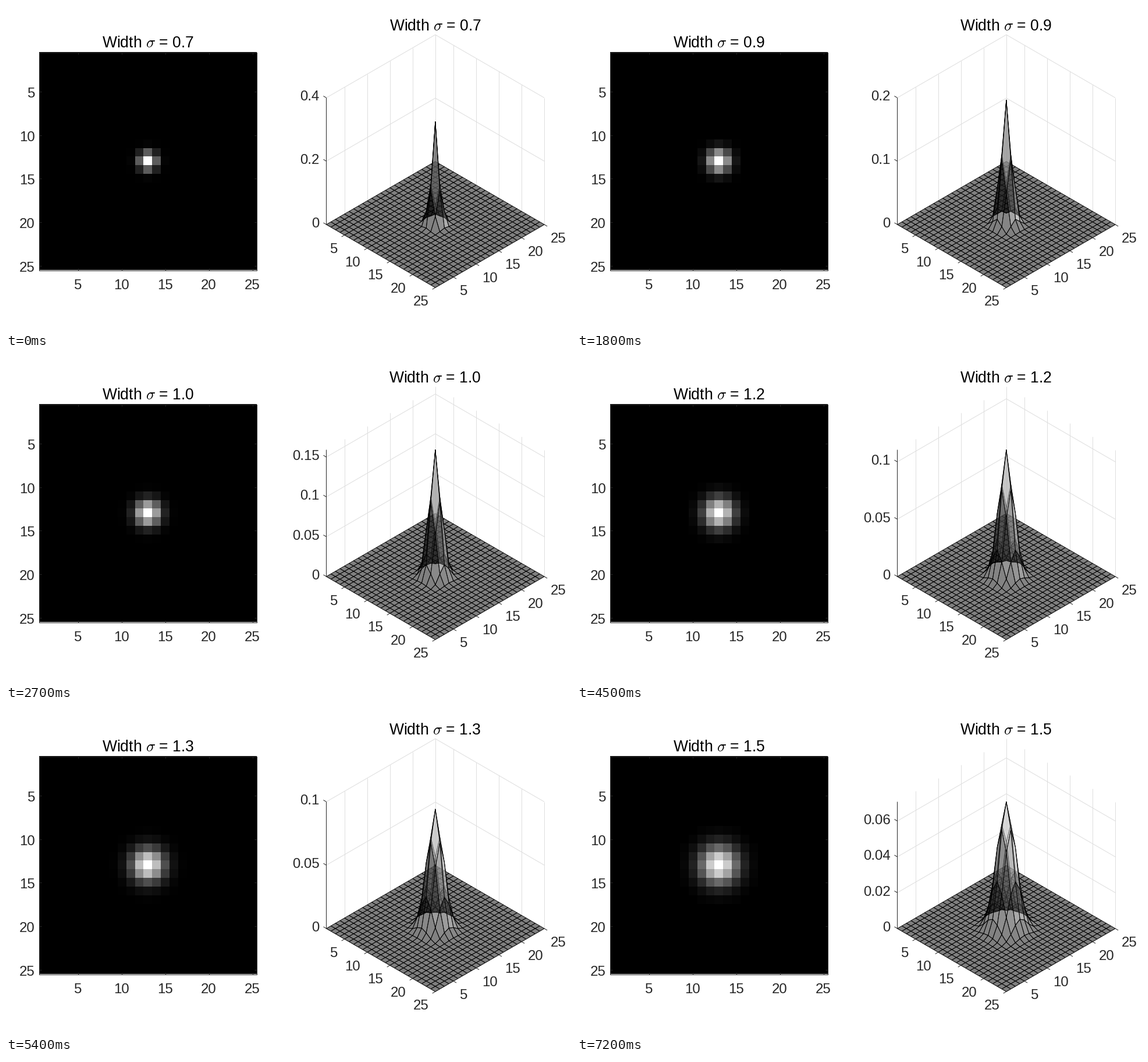
Recreate the animation shown at these times as a matplotlib script. Size 971x556 px, loop 8 s.

```python
import math

import matplotlib as mpl
import matplotlib.pyplot as plt
import numpy as np
from matplotlib.animation import FuncAnimation
from matplotlib.collections import LineCollection, PolyCollection

W, H, DPI = 971, 556, 128
PX = 72 / DPI                       # points per pixel
N = 25
TICKS = range(5, N + 1, 5)
INK = (0.15, 0.15, 0.15)
GRID = (0.87, 0.87, 0.87)
STEP_FRAMES, FRAMES, INTERVAL = 9, 80, 100

# Image panel
LEFT, TOP, SIDE = 57.0, 79.5, 374.0
CELL = SIDE / N

# Isometric surface panel
X0, Y0 = 550.5, 375.0               # left corner of the floor
DX, DY, HEIGHT = 187.3 / (N - 1), 108.2 / (N - 1), 217.5

mpl.rcParams["font.family"] = "Liberation Sans"
mpl.rcParams["mathtext.fontset"] = "cm"

fig = plt.figure(figsize=(W / DPI, H / DPI), dpi=DPI, facecolor="white")
ax = fig.add_axes([0, 0, 1, 1])


def label(x, y, text="", ha="center", size=24, color=INK):
    return ax.text(x, y, text, ha=ha, va="baseline", fontsize=size * PX, color=color)


def lines(segments, color, z, width=1.0):
    group = LineCollection(segments, colors=[color], linewidths=width * PX, zorder=z)
    return ax.add_collection(group, autolim=False)


def project(a, b, h=0.0):
    """Screen place of grid point (a, b) at relative height h."""
    x = X0 + (a + b - 2) * DX
    y = Y0 + (a - b) * DY - h * HEIGHT
    return x, y


def gaussian(sigma):
    r = np.arange(N) - N // 2
    g = np.exp(-(r[:, None] ** 2 + r ** 2) / (2 * sigma ** 2))
    return g / g.sum()


def z_scale(peak):
    """Upper limit and tick step: a round limit unless it wastes too much room."""
    steps = (0.01, 0.02, 0.05, 0.1, 0.2, 0.5)
    step = next(s for s in steps if math.ceil(peak / s) <= 3)
    top = math.ceil(peak / step) * step
    if peak / top < 0.8:
        top = peak
        step = next(s for s in steps if int(peak / s) <= 3)
    return top, step


# Fixed parts of the image panel
image = ax.imshow(np.zeros((N, N)), cmap="gray", vmin=0, vmax=1, aspect="auto",
                  interpolation="nearest", zorder=1,
                  extent=(LEFT, LEFT + SIDE, TOP + SIDE, TOP))
right, bottom = LEFT + SIDE, TOP + SIDE
lines([[(LEFT, TOP), (right, TOP), (right, bottom), (LEFT, bottom), (LEFT, TOP)]], INK, 2)
marks = []
for t in TICKS:
    x, y = LEFT + (t - 0.5) * CELL, TOP + (t - 0.5) * CELL
    marks += [[(x, TOP), (x, TOP + 3.7)], [(x, bottom), (x, bottom - 3.7)],
              [(LEFT, y), (LEFT + 3.7, y)], [(right, y), (right - 3.7, y)]]
    label(x - 0.5, 486.5, str(t))
    label(50, y + 10, str(t), "right")
lines(marks, INK, 2)

# Fixed parts of the surface panel
walls, marks = [], []
for t in TICKS:
    walls += [[project(1, t), project(1, t, 1)], [project(t, N), project(t, N, 1)]]
    x, y = project(t, 1)
    marks.append([(x, y), (x - 5, y + 3)])
    label(x - 11.5, y + 31, str(t), "right")
    x, y = project(N, t)
    marks.append([(x, y), (x + 5, y + 3)])
    label(x + 10.5, y + 31, str(t), "left")
lines(walls, GRID, 1)
lines(marks, INK, 4)
lines([[project(1, 1, 1), project(1, 1), project(N, 1), project(N, N)]], INK, 4)

# Moving parts
z_grid = lines([], GRID, 1)
z_marks = lines([], INK, 4)
z_labels = [label(0, 0, ha="right") for _ in range(4)]
titles = [label(244, 71, size=26.5, color="black"),
          label(737.5, 42, size=26.5, color="black")]
surface = ax.add_collection(
    PolyCollection([], edgecolors="black", linewidths=0.85 * PX, zorder=3), autolim=False)

# Cells from back to front
cells = sorted(((a, b) for a in range(1, N) for b in range(1, N)),
               key=lambda c: c[0] - c[1])


def draw(frame):
    sigma = 0.7 + 0.1 * min(frame // STEP_FRAMES, 8)
    g = gaussian(sigma)
    peak = g.max()
    shade = (g - g.min()) / (peak - g.min())
    top, step = z_scale(peak)
    rel = g / top

    image.set_data(shade)
    for title in titles:
        title.set_text(rf"Width $\sigma$ = {sigma:.1f}")

    polys, colors = [], []
    for a, b in cells:
        corners = ((a, b), (a + 1, b), (a + 1, b + 1), (a, b + 1))
        polys.append([project(i, j, rel[i - 1, j - 1]) for i, j in corners])
        v = shade[a - 1, b - 1]
        colors.append((v, v, v, 0.5))
    surface.set_verts(polys)
    surface.set_facecolor(colors)

    count = int(top / step + 1e-6) + 1
    grid, ticks = [], []
    for k, text in enumerate(z_labels):
        text.set_visible(k < count)
        if k >= count:
            continue
        h = k * step / top
        x, y = project(1, 1, h)
        grid.append([(x, y), project(1, N, h), project(N, N, h)])
        ticks.append([(x, y), (x - 5, y - 3)])
        text.set_text(f"{k * step:g}")
        text.set_position((539, y + 5))
    z_grid.set_segments(grid)
    z_marks.set_segments(ticks)
    return []


ax.set_xlim(0, W)
ax.set_ylim(H, 0)
ax.axis("off")

anim = FuncAnimation(fig, draw, frames=FRAMES, interval=INTERVAL, repeat=True,
                     repeat_delay=0, init_func=lambda: draw(0), blit=False)
plt.show()
```
